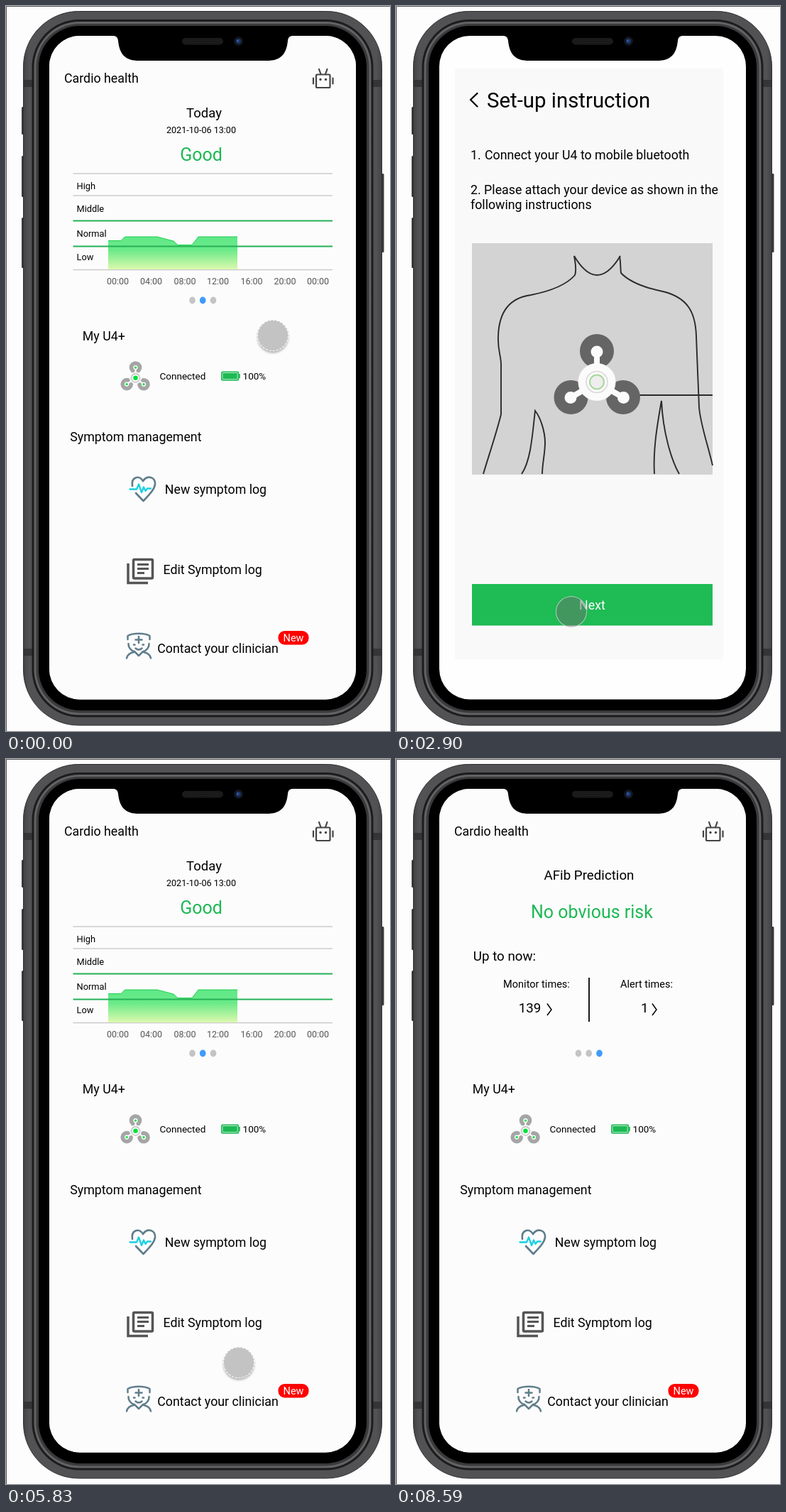
Animation of 541 by 1021 pixels, one loop 9.27 s. Source, as an HTML page:

```html
<!DOCTYPE html>
<html lang="en">
<head>
<meta charset="utf-8">
<title>Cardio health</title>
<style>
  html, body { margin: 0; width: 100%; height: 100%; overflow: hidden; background: #fdfdfd; }
  #stage { position: relative; width: 541px; height: 1021px; overflow: hidden; }
  svg { display: block; }
  text { font-family: Roboto, Arial, sans-serif; font-size: 17.8px; fill: #000; }
  .mid { text-anchor: middle; }
  .small text { font-size: 12.8px; }
  .axis text { font-size: 12.5px; fill: #555; text-anchor: middle; }
  .info { font-size: 13.5px; }
  .tip { font-size: 14.55px; }
  .lead { font-size: 18.75px; }
  .big { font-size: 25px; fill: #1db954; }
  .white { fill: #fff; }
  .line { fill: none; stroke-linecap: round; stroke-linejoin: round; }

  #home, #setup, #done, #today, #risk, #steps, #cursor, #dot {
    animation: 9270ms step-end infinite;
  }
  #home { animation-name: home; }
  #setup { animation-name: setup; }
  #steps { animation-name: steps; }
  #done { animation-name: done; }
  #today { animation-name: today; }
  #risk { animation-name: risk; }
  @keyframes home { 0%, 62.89% { opacity: 1 } 21.35% { opacity: 0 } 100% { opacity: 1 } }
  @keyframes setup { 0%, 44.55%, 100% { opacity: 0 } 21.35% { opacity: 1 } }
  @keyframes steps { 0% { transform: none } 32.57%, 100% { transform: translateX(-13px) } }
  @keyframes done { 0%, 62.89%, 100% { opacity: 0 } 44.55% { opacity: 1 } }
  @keyframes today { 0% { opacity: 1 } 75.51%, 100% { opacity: 0 } }
  @keyframes risk { 0% { opacity: 0 } 75.51%, 100% { opacity: 1 } }

  #cursor { position: absolute; left: -22px; top: -22px; animation-name: move; }
  #dot {
    box-sizing: border-box; width: 44px; height: 44px; border-radius: 50%;
    animation-name: press;
  }
  /* The pointer travels in held steps between a few stops. */
  @keyframes move {
    0% { transform: translate(376px, 464px) }
    10.35% { transform: translate(376px, 464px); animation-timing-function: steps(6, start) }
    19.63% { transform: translate(271px, 519px) }
    22.86% { transform: translate(271px, 519px); animation-timing-function: steps(4, start) }
    28.47% { transform: translate(262px, 872px); animation-timing-function: steps(2, start) }
    31.28% { transform: translate(247px, 853px) }
    37.21% { transform: translate(247px, 853px); animation-timing-function: steps(3, start) }
    41.69% { transform: translate(281px, 853px) }
    49.51% { transform: translate(281px, 853px); animation-timing-function: steps(3, start) }
    54.36% { transform: translate(328px, 850px) }
    64.4% { transform: translate(328px, 850px); animation-timing-function: steps(5, start) }
    72.54% { transform: translate(358px, 346px) }
    73.89% { transform: translate(358px, 346px); animation-timing-function: steps(3, start) }
    78.69% { transform: translate(119px, 412px); animation-timing-function: steps(6, start) }
    86.83% { transform: translate(320px, 287px); animation-timing-function: steps(3, start) }
    91.2% { transform: translate(400px, 550px); animation-timing-function: steps(1, start) }
    92.66%, 100% { transform: translate(506px, 979px) }
  }
  @keyframes press {
    0%, 21.35%, 32.57%, 44.55%, 62.89%, 77.07% {
      opacity: 1; background: rgba(177, 177, 177, .75); border: 1px dashed #fff;
      box-shadow: 0 3px 3px rgba(0, 0, 0, .25);
    }
    19.74%, 31.28%, 43.14%, 58.89%, 73.89% {
      opacity: 1; background: rgba(110, 110, 110, .45); border: 1px solid rgba(225, 225, 225, .7);
      box-shadow: none;
    }
    92.66%, 100% { opacity: 0 }
  }
</style>
</head>
<body>
<div id="stage">
<svg width="541" height="1021" viewBox="0 0 541 1021">
  <defs>
    <linearGradient id="fill" x1="0" y1="0" x2="0" y2="1">
      <stop offset="0" stop-color="#60e889"/>
      <stop offset=".4" stop-color="#6aea88"/>
      <stop offset="1" stop-color="#dcf9ae"/>
    </linearGradient>
    <linearGradient id="rim" x1="0" x2="1">
      <stop offset="0" stop-color="#434346"/>
      <stop offset=".015" stop-color="#525255"/>
      <stop offset=".985" stop-color="#525255"/>
      <stop offset="1" stop-color="#434346"/>
    </linearGradient>
    <pattern id="mesh" width="3" height="3" patternUnits="userSpaceOnUse">
      <rect width="3" height="3" fill="#1e1e1f"/>
      <circle cx="1.5" cy="1.5" r=".8" fill="#0c0c0c"/>
    </pattern>
    <g id="device">
      <g fill="#a5a5a5">
        <circle cy="-92" r="55"/><circle cx="-77" cy="55" r="55"/><circle cx="72" cy="56" r="55"/>
      </g>
      <g fill="#fff">
        <circle r="53.5"/>
        <circle cy="-92" r="19.5"/><circle cx="-77" cy="55" r="19.5"/><circle cx="72" cy="56" r="19.5"/>
      </g>
      <path d="M0-92V0L-77 55M0 0L72 56" fill="none" stroke="#fff" stroke-width="13"/>
      <circle r="42" fill="none" stroke="#c4c4c4" stroke-width="4"/>
      <g fill="#00e13c">
        <circle r="31.5"/>
        <circle cy="-92" r="10.5"/><circle cx="-77" cy="55" r="10.5"/><circle cx="72" cy="56" r="10.5"/>
      </g>
    </g>
    <g id="battery">
      <rect width="40" height="21" rx="3.5" fill="#1db954"/>
      <rect x="39" y="5.5" width="3.5" height="10" rx="1" fill="#1db954"/>
      <rect x="3.2" y="3.2" width="33.6" height="14.6" rx="1" fill="none" stroke="#e4f7ea" stroke-width="1.3"/>
    </g>
  </defs>

  <!-- phone -->
  <rect width="541" height="1021" fill="#fdfdfd"/>
  <path d="M.5 1021V.5H541" fill="none" stroke="#555"/>
  <g fill="#3a3a3d">
    <rect x="22" y="142" width="6" height="39" rx="1.5"/>
    <rect x="22" y="211" width="6" height="58" rx="1.5"/>
    <rect x="22" y="298" width="6" height="71" rx="1.5"/>
    <rect x="526" y="236" width="6.5" height="111" rx="1.5"/>
  </g>
  <rect x="24.5" y="7.5" width="505" height="1005.5" rx="78" fill="url(#rim)" stroke="#303032"/>
  <path d="M25 104h12v10h-12zM517 104h12v10h-12zM25 905h12v10h-12zM517 905h12v10h-12z" fill="#353538"/>
  <rect x="36.5" y="19" width="481" height="982.5" rx="67" fill="#1c1c1d"/>
  <rect x="39.5" y="22" width="475" height="976.5" rx="64" fill="#626264"/>
  <rect x="42.5" y="25" width="469" height="970.5" rx="61" fill="#3a3a3c"/>
  <rect x="46" y="28" width="462" height="964" rx="58" fill="#000"/>
  <rect x="61" y="42" width="432" height="934.5" rx="43" fill="#fefefe"/>

  <!-- home -->
  <g id="home">
    <rect x="61" y="42" width="432" height="934.5" rx="43" fill="#fcfcfc"/>
    <text x="82" y="108">Cardio health</text>
    <g class="line" stroke="#444" stroke-width="2.2">
      <rect x="437" y="96.5" width="19.5" height="18.5" rx="1.5"/>
      <path d="M443.5 96L441 89M450 96L452.5 89M433 101.5v8M460.5 101.5v8"/>
    </g>
    <circle cx="443" cy="103.5" r="1.7" fill="#444"/>
    <circle cx="450.5" cy="103.5" r="1.7" fill="#444"/>

    <g id="today">
      <text class="mid" x="279" y="157" style="font-size:18.5px">Today</text>
      <text class="mid" x="275" y="178.5" style="font-size:12.6px">2021-10-06 13:00</text>
      <text class="mid big" x="275" y="218">Good</text>
      <path d="M94.5 236H460M94.5 267H460M94.5 371.5H460" stroke="#cbcbcb" stroke-width="1.4"/>
      <path d="M144 371V330.5H162L167.5 325H213L236 331L242 336.5H262L271 325H326V371Z" fill="url(#fill)"/>
      <path d="M144 330.5H162L167.5 325H213L236 331L242 336.5H262L271 325H326" fill="none" stroke="#1fd050"/>
      <path d="M94.5 302.5H460M94.5 338.5H460" stroke="#25b056" stroke-width="2"/>
      <g class="small">
        <text x="99.5" y="258">High</text>
        <text x="99.5" y="290">Middle</text>
        <text x="99.5" y="325">Normal</text>
        <text x="99.5" y="358">Low</text>
      </g>
      <g class="axis">
        <text x="157.5" y="392">00:00</text><text x="204.5" y="392">04:00</text>
        <text x="252" y="392">08:00</text><text x="298.5" y="392">12:00</text>
        <text x="346" y="392">16:00</text><text x="393" y="392">20:00</text>
        <text x="439.5" y="392">00:00</text>
      </g>
      <g fill="#c4c4c4">
        <ellipse cx="262.5" cy="414.5" rx="4.3" ry="5"/>
        <ellipse cx="277.2" cy="414.5" rx="4.3" ry="5" fill="#3f9bfb"/>
        <ellipse cx="292" cy="414.5" rx="4.3" ry="5"/>
      </g>
    </g>

    <g id="risk">
      <text class="mid lead" x="272" y="170">AFib Prediction</text>
      <text class="mid big" x="276" y="223.5">No obvious risk</text>
      <text class="lead" x="108.8" y="284">Up to now:</text>
      <text class="mid tip" x="198" y="322">Monitor times:</text>
      <text class="mid tip" x="353" y="322">Alert times:</text>
      <text class="lead" x="172.8" y="357">139</text>
      <text class="lead" x="345" y="357">1</text>
      <path d="M213 344.5L219 353L213 361M361 344.5L367 353L361 361" fill="none" stroke="#000" stroke-width="1.5"/>
      <path d="M272 308V370" stroke="#000" stroke-width="1.8"/>
      <g fill="#c4c4c4">
        <ellipse cx="257" cy="414.5" rx="4.3" ry="5"/>
        <ellipse cx="271.7" cy="414.5" rx="4.3" ry="5"/>
        <ellipse cx="286.5" cy="414.5" rx="4.3" ry="5" fill="#3f9bfb"/>
      </g>
    </g>

    <text x="107.8" y="471">My U4+</text>
    <g transform="translate(182.5 523.8)">
      <use href="#device" transform="scale(.16)"/>
      <circle r="5.8" fill="#fff" stroke="#c4c4c4" stroke-width="1.3"/>
      <circle r="3.3" fill="#00e13c"/>
    </g>
    <text class="info" x="216.5" y="526">Connected</text>
    <use href="#battery" transform="translate(303 514.5) scale(.63)"/>
    <text class="info" x="333.6" y="525.5">100%</text>

    <text x="90.3" y="612.5">Symptom management</text>
    <g class="line" stroke="#607d8b" stroke-width="2.7">
      <path d="M178 676C176 663 188 660 193 669C199 660 211 663 210 674C209 680 205 685 193.5 697L183 686"/>
      <path d="M174.5 680.5H184L187 673.5L191 685L194 677.5L196.5 683L199 679.5H204" stroke="#19d0e2" stroke-width="2.3"/>
    </g>
    <text x="223.8" y="686.5">New symptom log</text>

    <g fill="none" stroke="#555" stroke-width="3.5">
      <path d="M172 785V812.5H200"/>
      <rect x="179.5" y="779.5" width="27" height="26.5" rx="1.5"/>
      <path d="M185 786.5H201M185 792.5H201M185 798.5H195" stroke-width="3"/>
    </g>
    <text x="221.5" y="799.5">Edit Symptom log</text>

    <g class="line" stroke="#607d8b" stroke-width="2.5">
      <path d="M171.5 892V887C178 882.5 196 882.5 202.5 887V892"/>
      <path d="M172.5 898C172 903 176 908 181 909L187 915L193 909C198 908 202 903 201.5 898"/>
      <path d="M187 888V897M182.5 892.5H191.5M180 899.5h1.5M192.5 899.5h1.5M182.5 904.5Q187 908.5 191.5 904.5"/>
      <path d="M170 918.5C171 913 175 911 180 910M204 918.5C203 913 199 911 194 910"/>
    </g>
    <text x="213.3" y="910.5">Contact your clinician</text>
    <rect x="383.5" y="880" width="43" height="19.5" rx="9" fill="#f00"/>
    <text class="mid white" x="405" y="894.5" style="font-size:14.5px">New</text>
  </g>

  <!-- instructions -->
  <g id="setup">
    <rect x="83" y="88" width="378" height="832" fill="#f9f9f9"/>
    <g id="steps">
      <path d="M114.5 123L105 132L114.5 141.5" class="line" stroke="#000" stroke-width="2.3"/>
      <text x="128" y="142.5" style="font-size:29.4px">Set-up instruction</text>
      <text x="105" y="215.5">1.</text>
      <text x="125" y="215.5">Connect your U4 to mobile bluetooth</text>
      <text x="105" y="264.5">2. Please attach your device as shown in the</text>
      <text x="105" y="285.5">following instructions</text>
      <rect x="107" y="334" width="339" height="326" fill="#d3d3d3"/>
      <g fill="none" stroke="#2a2a2a" stroke-width="1.9">
        <path d="M251 352Q283 406 316 352"/>
        <path d="M251 352C254 368 254 374 252 379C240 393 215 402 190 407C160 411 145 430 144 465C143 485 148 492 148 505V575C142 600 130 635 123 659"/>
        <path d="M315 352C317 364 316 370 317 376C330 390 355 398 380 403C410 412 422 430 423 465L427 565C429 590 440 620 446 647"/>
        <path d="M177 659C190 640 192 605 196 570C204 580 210 600 210 615C210 630 206 645 206 659"/>
        <path d="M364 659C362 625 368 590 374 556C376 600 388 640 399 659"/>
        <path d="M343 548H446"/>
      </g>
      <g fill="#656565">
        <circle cx="283" cy="486" r="24"/><circle cx="246.5" cy="551" r="24"/><circle cx="320" cy="551" r="24"/>
      </g>
      <path d="M283 487V530L246 551.5M283 530L320.5 551.5" fill="none" stroke="#fbfbfb" stroke-width="8"/>
      <g fill="#fbfbfb">
        <circle cx="283" cy="487" r="8.5"/><circle cx="246" cy="551.5" r="8.5"/><circle cx="320.5" cy="551.5" r="8.5"/>
        <circle cx="283" cy="529.5" r="26.5"/>
      </g>
      <circle cx="283" cy="529.5" r="15" fill="none" stroke="#d8d8d8" stroke-width="1.5"/>
      <circle cx="283" cy="529.5" r="10" fill="#eee" stroke="#a8d89c" stroke-width="2"/>
      <rect x="107" y="814" width="339" height="58.5" fill="#1fbb55"/>
      <text class="mid white" x="276.5" y="850">Next</text>
    </g>
  </g>

  <!-- success -->
  <g id="done">
    <text x="110" y="155" style="font-size:37.8px">Set up successfully!</text>
    <text class="mid lead" x="277" y="239">U4 is monitoring your heart health.</text>
    <text class="mid lead" x="277" y="261">Press the middle button when heart</text>
    <text class="mid lead" x="277" y="283">event happens</text>
    <use href="#device" x="279" y="472"/>
    <use href="#battery" x="236" y="627.5"/>
    <text x="285" y="643" style="font-size:14.5px;fill:#1db954">100%</text>
    <text class="tip" x="136.5" y="700">Tip: U4 has 7 days of battery life. You can do</text>
    <text class="tip" x="136.5" y="717">daily activities while being monitored</text>
    <rect x="133" y="815" width="291" height="58" rx="5" fill="#1fbb55"/>
    <text class="mid white" x="278.5" y="850.5">Confirm</text>
  </g>

  <!-- notch -->
  <path d="M149 41.5C155 42 157.5 44 158 49C160 69 169 77 187 77H368C386 77 395 69 397 49C397.5 44 400 42 406 41.5Z" fill="#000"/>
  <rect x="248" y="45" width="58" height="9.5" rx="4.7" fill="url(#mesh)"/>
  <circle cx="327.5" cy="49.5" r="6.5" fill="#12161f"/>
  <circle cx="327.5" cy="49.5" r="3.5" fill="#1c3567"/>
  <circle cx="326.5" cy="49" r="1.4" fill="#3a62a8"/>
</svg>
<div id="cursor"><div id="dot"></div></div>
</div>
</body>
</html>
```
